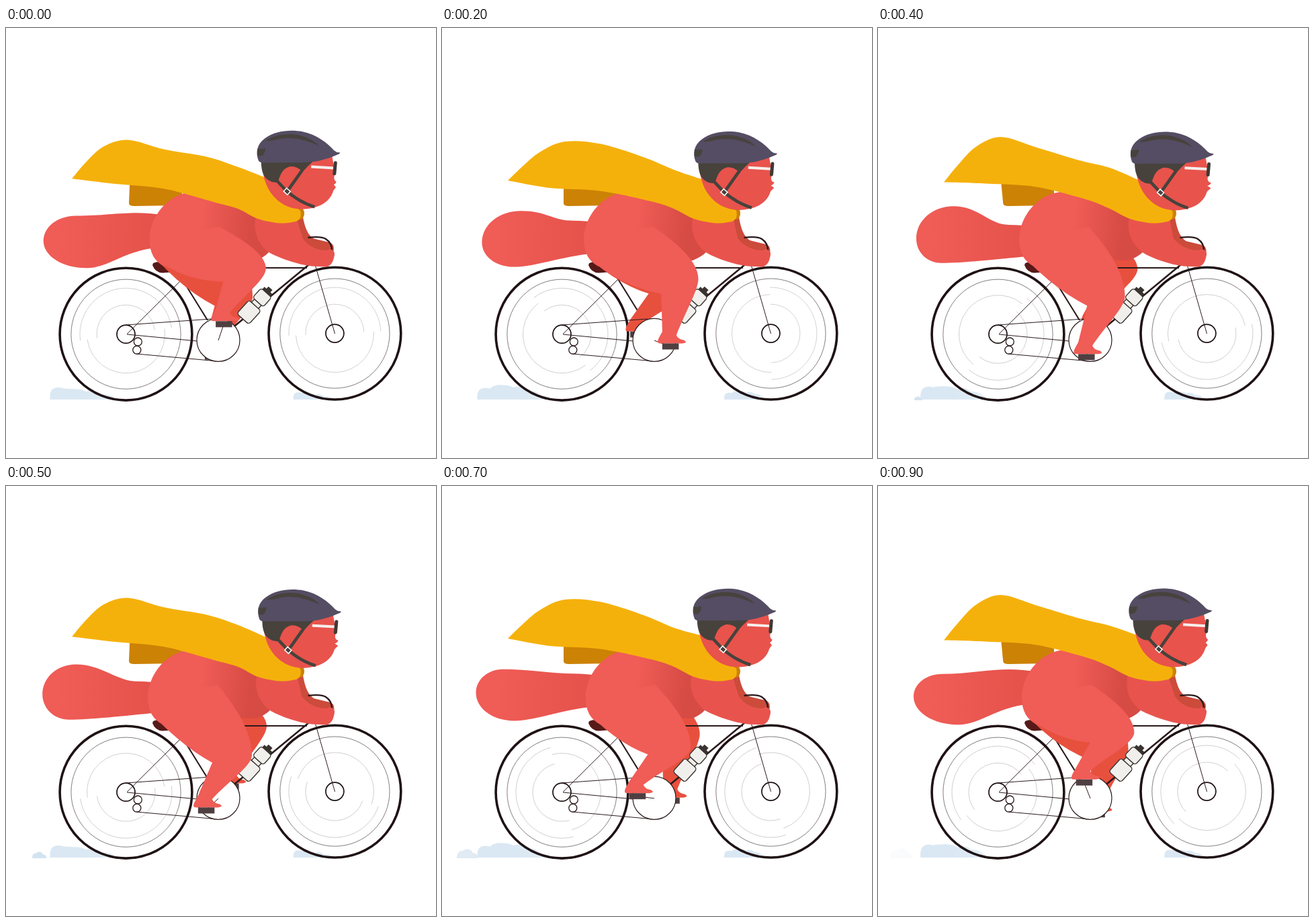
Write an HTML page that moves like this. It is 640 px wide and 640 px high and loops after 1000 ms.

```html
<!DOCTYPE html>
<html lang="en">
<head>
<meta charset="utf-8">
<title>Caped cyclist</title>
<style>
  html, body { margin: 0; width: 100%; height: 100%; overflow: hidden; background: #fff; }
  svg { display: block; width: 100vw; height: 100vh; }
  .line { fill: none; stroke: #2b1a1c; stroke-width: 1; }
  .tube { stroke-width: 2.1; }
  .tyre { fill: none; stroke: #1f1214; stroke-width: 3.6; }
  .rim { fill: none; stroke: #4d4547; stroke-width: .7; }
  .hub { fill: none; stroke: #1f1214; stroke-width: 1.7; }
  .glint path { fill: none; stroke: #c3bfbf; stroke-width: .7; }
  .pedal { fill: #4f3f41; }
  .dark { fill: #47423c; }
  .strap { fill: none; stroke: #47423c; stroke-width: 4.6; }
  .bottle rect { fill: #f1efec; stroke: #3a3330; stroke-width: 1.4; }
  .bottle .cap { fill: #3a3330; stroke: none; }
</style>
</head>
<body>
<svg viewBox="0 0 640 640" xmlns="http://www.w3.org/2000/svg">
  <defs>
    <linearGradient id="mist" gradientUnits="userSpaceOnUse" x1="110" x2="171" y1="0" y2="0">
      <stop offset="0" stop-color="#dae8f3"/><stop offset=".6" stop-color="#dfebf4"/><stop offset="1" stop-color="#f6fafc"/>
    </linearGradient>
    <linearGradient id="tailTone" gradientUnits="userSpaceOnUse" x1="80" x2="225" y1="0" y2="0">
      <stop offset="0" stop-color="#f05c56"/><stop offset="1" stop-color="#e4524a"/>
    </linearGradient>
    <linearGradient id="bodyTone" gradientUnits="userSpaceOnUse" x1="322" x2="396" y1="0" y2="8">
      <stop offset="0" stop-color="#f05c56"/><stop offset="1" stop-color="#d64b44"/>
    </linearGradient>
    <g id="wheel">
      <circle class="tyre" r="98.4"/>
      <circle class="rim" r="81.6"/>
      <circle class="hub" r="13.5"/>
    </g>
    <g id="arcs" class="glint">
      <path d="M0-68.5A68.5 68.5 0 0 1 0 68.5"/>
      <path d="M0 58A58 58 0 0 1 0-58"/>
      <path d="M0-43.5A43.5 43.5 0 0 1 0 43.5"/>
    </g>
    <path id="cloud" fill="url(#mist)"/>
  </defs>

  <use href="#cloud"/>
  <use href="#cloud" transform="translate(388.4 221.2) scale(.6)"/>
  <path id="puff" fill="#d3e3f0" d="M0 0C-.02-.6.15-.8.3-.8C.45-1.1.7-1 .76-.55C.9-.6 1-.4 1 0Z"/>

  <g transform="translate(178.5 455.7)"><use href="#wheel"/><use id="rear" href="#arcs"/></g>
  <g transform="translate(489.4 454.6)"><use href="#wheel"/><use id="front" href="#arcs"/></g>

  <path id="tail" fill="url(#tailTone)"/>
  <path id="lining" fill="#cc8205"/>
  <path fill="#571a18" d="M219 350Q227 346 242 350L266 362L233 364.500Q222 364 218 353Z"/>
  <path class="line" d="M180 455.500L262 374"/>
  <path class="line tube" d="M256 364L300 435"/>
  <rect id="farPedal" class="pedal" x="-12" y="-4.500" width="24.500" height="9"/>
  <path id="farLeg" fill="#e8503e"/>

  <path class="line tube" d="M262 357H448"/>
  <path class="line tube" style="stroke-width:2.600" d="M451 352L318 462"/>
  <g class="bottle" transform="translate(361.500 423) rotate(42)">
    <rect class="cap" x="-4" y="-48" width="8" height="8"/>
    <rect class="cap" x="-8" y="-43.500" width="16" height="5"/>
    <rect x="-7" y="-20" width="14" height="8"/>
    <rect x="-10.500" y="-39" width="21" height="19" rx="4"/>
    <rect x="-12" y="-13.500" width="24" height="27" rx="4"/>
  </g>
  <path class="line" d="M178 442L306 433M180 456L285 466M194 485L316 496"/>
  <g class="line" style="stroke-width:1.300"><circle cx="196.300" cy="467" r="6"/><circle cx="194.800" cy="479.200" r="6"/></g>
  <circle class="line" cx="316" cy="464.400" r="32" style="fill:#fff;stroke-width:1.200"/>

  <path id="body" fill="url(#bodyTone)"/>
  <path id="crank" class="line"/>
  <path id="nearLeg" fill="#f05c56"/>
  <rect id="nearPedal" class="pedal" x="-12" y="-4.500" width="24.500" height="9"/>

  <path class="line" d="M460.500 354L489.500 455"/>
  <path id="farArm" fill="#cc4b3b" d="M424 256L440 268C443 293 448 307 458 313L483 319Q490 323 487 334L465 332C448 327 438 315 432 298Z"/>
  <path class="line" style="stroke-width:2.400" d="M449.500 312Q469 309.500 476 314Q485 320 485 331"/>
  <path id="arm" fill="#e8544d"/>

  <ellipse cx="438" cy="276" rx="6" ry="9" fill="#cc8205"/>
  <path id="cape" fill="#f5b10b"/>

  <g id="head">
    <path id="face" fill="#e8534c"/>
    <path class="dark" d="M379.500 197L458 197Q448 206 441 214Q433 205 422 206C411 209 408 218 404.500 229Q397 231 390 226C381 220 379.500 208 379.500 197Z"/>
    <path class="strap" d="M441 211L419 242"/>
    <path class="strap" d="M402 226L416 241Q436 259 459 266"/>
    <rect x="-3.800" y="-3.300" width="7.600" height="6.600" transform="translate(418 243) rotate(42)" fill="#47423c" stroke="#fff" stroke-width="1.500"/>
    <path fill="#544d63" d="M375.500 197C371 185 373 173 385 164C400 153 422 150.500 441 154C462 158 478 171 488 182Q492 185.500 497 185L496 187Q490 189.500 484 192C470 197 456 200 440 200H386Q378 201 375.500 197Z"/>
    <path class="dark" d="M386 168C398 158 424 154.500 442 161C453 164.500 460 169 465 175C450 168 436 163.500 419 163.500C406 163.500 399 168 391 167.500Z"/>
    <path class="dark" d="M374 180L386 179Q385 186 382 189Q378 191.500 374 189Z"/>
    <path d="M454 206.300L488 208.200" stroke="#f6eeec" stroke-width="4" fill="none"/>
    <path d="M490 200.500L488.600 216.500" stroke="#3f3934" stroke-width="5" stroke-linecap="round" fill="none"/>
  </g>
</svg>
<script>
const LOOP = 1000, STEP = 100;

const $ = id => document.getElementById(id);
const set = (id, name, value) => $(id).setAttribute(name, value);
const shape = (id, d) => set(id, 'd', d);
const move = (id, x, y) => set(id, 'transform', `translate(${x} ${y})`);
const cos = deg => Math.cos(deg * Math.PI / 180);

// a value swinging around its middle, highest at the angle `peak`
const swing = (angle, mid, size, peak) => mid + size * cos(angle - peak);

// smooth curve through a few points, starting at the first
function through(pts) {
  return pts.slice(1).map((q, i) => {
    const p = pts[i], o = pts[i - 1] || p, r = pts[i + 2] || q;
    return `C${p[0] + (q[0] - o[0]) / 6},${p[1] + (q[1] - o[1]) / 6} ` +
           `${q[0] - (r[0] - p[0]) / 6},${q[1] - (r[1] - p[1]) / 6} ${q}`;
  }).join('');
}

const pedalAt = a => [316 + 25.5 * cos(a - 90), 465 - 25.5 * cos(a)];

function leg(angle, hip) {
  const kx = swing(angle, 377, 11, 45), ky = swing(angle, 379, 22, 215);
  const bx = swing(angle, 317, 11.5, 75), by = swing(angle, 395.5, 18, 200);
  const [px, py] = pedalAt(angle);
  const hx = 318 + hip, hy = 296, fx = px + 9, fy = py - 17;
  return `M${hx},${hy}C${hx + .5 * (kx - hx)},${hy + .3 * (ky - hy)} ${kx},${ky - .35 * (ky - hy)} ${kx},${ky}` +
    `C${kx},${ky + 16} ${fx + .4 * (kx - fx)},${fy + .4 * (ky - fy)} ${fx},${fy}` +
    `Q${fx + 2},${fy + 6} ${px + 20},${py - 9.5}Q${px + 27},${py - 6} ${px + 18},${py - 4.5}` +
    `H${px - 16}Q${px - 21},${py - 5} ${px - 17},${py - 13}L${px - 12},${py - 22}L${bx},${by}` +
    `Q268,${376 + .45 * (by - 378)} ${228 + hip},348L${228 + hip},310Z`;
}

function body(hip) {
  const x = 214 + hip, chest = 393 - hip;
  return `M${x},315C${x},285 ${x + 21},255 ${x + 51},246L300,238L382,262L${chest},320` +
    `Q${chest + 6},334 373,346L330,345L${x + 22},355C${x + 8},348 ${x},335 ${x},315Z`;
}

function tail(a) {
  const lx = swing(a, 55, 4.5, 80), ly = swing(a, 313.5, 6, 55);
  const tx = swing(a, 104, 14, 90), ty = swing(a, 272.5, 7.5, -20);
  const bx = swing(a, 107, 14, -20), by = swing(a, 352.5, 5, 20);
  const root = swing(a, 283, 10, 140), low = swing(a, 332, 7.5, 135), k = .56;
  return `M240,${root + 4}Q215,${root} 195,${root}C165,${root} ${tx + 38},${ty} ${tx},${ty}` +
    `C${tx - k * (tx - lx)},${ty} ${lx},${ly - k * (ly - ty)} ${lx},${ly}` +
    `C${lx},${ly + k * (by - ly)} ${bx - k * (bx - lx)},${by} ${bx},${by}` +
    `C${bx + 32},${by} 175,${low + 5} 225,${low}Z`;
}

// ripples run from the neck to the tip, twice per loop
function cape(a, bob) {
  const top = [[98, 227], [119, 204], [146, 180], [183, 166.5], [235, 176], [300, 193.5], [345, 209]]
    .map(([x, y]) => [x, swing(a, y, 4.5 * Math.min(1, (384 - x) / 80), 1.7 * (235 - x))]);
  const hem = [[310, 257.5], [235, 240], [160, 234.5]]
    .map(([x, y]) => [x, swing(a, y, 3.5, 60 + .55 * (310 - x))]);
  return `M${top[0]}` + through([...top, [384 + 2.6 * bob, 221.5 + 4.5 * bob]]) +
    'L438,272Q441,284 432,288' +
    through([[432, 288], [408, 290.5], [375, 284], [345, 269], ...hem, top[0]]) + 'Z';
}

function lining(a) {
  const x = swing(a, 183, 3.4, -90);
  return `M${swing(a, 182.5, 1.8, 0)},228L${x},261Q${x},265 ${x + 8},265L262,264V235Z`;
}

function cloud(a) {
  const x = swing(a, 59, 6.8, -19), h = swing(a, 18, 1.3, -90), top = swing(a, 20.6, 4, 200);
  return `M${x},553v-4q0,${4 - h} 12,${4 - h}q4,0 7,1q4,${h - top} 16,${h - top}` +
    `q13,0 19,4q12,-4 22,4q14,0 20,${top - 13}L171,553Z`;
}

function face(pout) {
  const lip = 491 + 2.2 * pout;
  return `M381 200C381 240 405 269 440 269.500C465 269 482 259 487 242Q488 240 ${lip - .5} 237` +
    `Q${lip - 1} 235 487.500 233Q${lip} 231 ${lip} 228Q489 228 488 223C490 212 487 202 485 190L400 195Z`;
}

function arm(s) {
  return `M${372 + s} 280C${367 + s} 300 ${373 + s} 320 ${391 + s} 334C410 344 435 352 455 354.500L477 355.500` +
    `Q486 353 488 342Q491 333 485 330Q480 328 478 331C462 331 450 325 ${442 - s} 313L${431 + s} 280Z`;
}

// a loose puff drifts off, slows down and fades
function puff(u) {
  const x = 18 + 36 * (1 - u) ** 2.4, gone = 54 - x;
  set('puff', 'transform', `translate(${x} 554) scale(${12 + .6 * gone} ${6 + .25 * gone})`);
  set('puff', 'opacity', Math.min(1, 1.55 - 1.4 * u));
}

function draw(t) {
  const a = 360 * t / LOOP, ripple = 2 * a;
  const bob = swing(a, .5, .5, 125) ** 1.5, hip = -4 * bob;
  const crank = a + swing(a, 32, 17.5, 140);
  const near = pedalAt(crank), far = pedalAt(crank + 180);

  set('rear', 'transform', `rotate(${a + swing(a, 262, 12, -90)})`);
  set('front', 'transform', `rotate(${a + swing(a, 278, 17, 130)})`);

  move('nearPedal', ...near);
  move('farPedal', ...far);
  shape('crank', `M316,465L${near}`);
  shape('nearLeg', leg(crank, hip));
  shape('farLeg', leg(crank + 180, hip));

  shape('body', body(hip));
  shape('arm', arm(2.6 * bob));
  move('farArm', .8 * bob, 4.5 * bob);
  move('head', 2.6 * bob, 2 * bob);
  shape('face', face(bob));

  shape('tail', tail(a));
  shape('cape', cape(ripple, bob));
  shape('lining', lining(ripple));
  shape('cloud', cloud(ripple));

  const u = (t - 400) / 500;
  $('puff').style.display = u < 0 ? 'none' : '';
  if (u >= 0) puff(u);
}

let last = -1;
const start = performance.now();
function tick() {
  const t = Math.floor((performance.now() - start) % LOOP / STEP) * STEP;
  if (t !== last) draw(last = t);
  requestAnimationFrame(tick);
}
tick();
</script>
</body>
</html>
```
